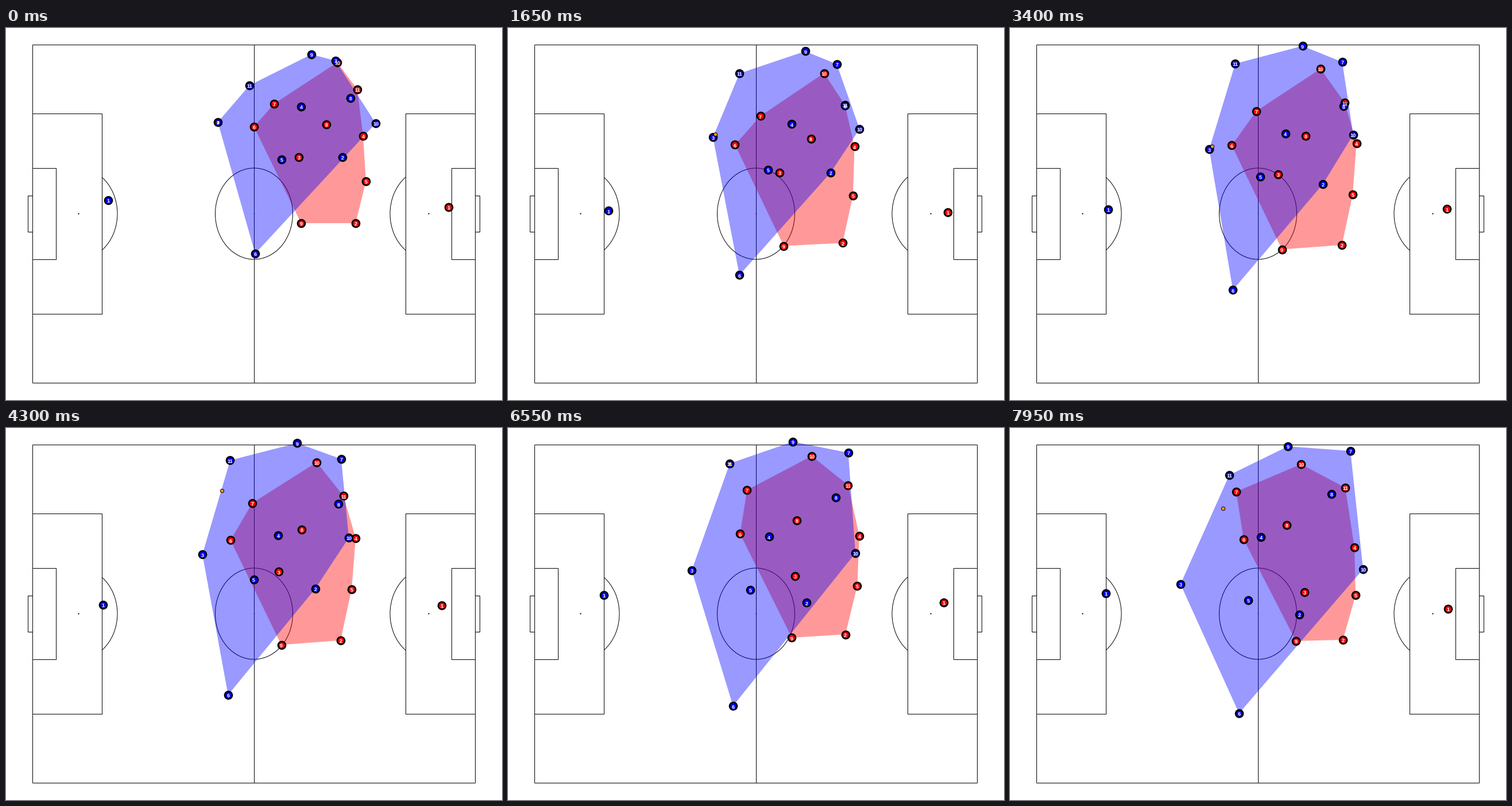
A matplotlib script for the animation above (8 s loop, 864 by 648 pixels).

```python
import numpy as np
import matplotlib.pyplot as plt
from matplotlib.animation import FuncAnimation
from matplotlib.patches import Arc, Circle, Polygon, Rectangle

W, H, FRAMES, STEP = 864, 648, 160, 50
LEFT, RIGHT, TOP, BOTTOM = 46, 817, 29, 618
MID_X, MID_Y = 432, 323.5

frames = np.arange(FRAMES)
u = (frames / (FRAMES - 1))[:, None]

# Each team drifts back and forth as one block; keepers mostly up and down.
SWAY = {"red": (-11.7, 16.9), "blue": (-4.4, 4.8), "keeper": (1, 10)}
teams = {"red": [], "blue": []}


def player(team, start, mid, end):
    """Parabola through three places, plus the sway of the block."""
    start, mid, end = map(np.array, (start, mid, end))
    bend = mid - (start + end) / 2
    run = start + (end - start) * u + bend * 4 * u * (1 - u)
    sway = SWAY[team if teams[team] else "keeper"]
    teams[team].append(run + np.array(sway) * np.sin(2 * np.pi * u))


# Shirt numbers follow the order of the calls, starting with the keeper.
player("red", (771, 312), (760, 311), (763, 315))
player("red", (609, 340), (581, 373), (580, 369))
player("red", (510, 225), (472, 252), (513, 286))
player("red", (622, 188), (607, 195), (600, 208))
player("red", (627, 267), (600, 284), (602, 291))
player("red", (432, 172), (389, 199), (407, 194))
player("red", (467, 132), (429, 136), (394, 111))
player("red", (558, 168), (515, 181), (482, 169))
player("red", (514, 340), (477, 381), (498, 371))
player("red", (577, 60), (541, 64), (507, 63))
player("red", (612, 107), (586, 123), (584, 104))

player("blue", (178, 300), (170, 311), (167, 288))
player("blue", (586, 225), (541, 277), (504, 325))
player("blue", (369, 164), (344, 217), (297, 272))
player("blue", (514, 137), (476, 186), (437, 190))
player("blue", (480, 229), (433, 262), (415, 300))
player("blue", (434, 393), (387, 462), (399, 497))
player("blue", (574, 57), (582, 56), (593, 40))
player("blue", (600, 122), (580, 134), (560, 115))
player("blue", (532, 46), (508, 28), (484, 32))
player("blue", (644, 166), (597, 189), (615, 246))
player("blue", (424, 100), (391, 58), (382, 82))


def ease(first, last):
    return np.clip((frames - first) / (last - first), 0, 1)[:, None]


def ball_run():
    """Dribbled by blue 3, passed to blue 11, then played back."""
    three, eleven = teams["blue"][2], teams["blue"][10]
    touch = np.abs(np.sin(np.pi * frames / 50))[:, None]
    dribble = three + np.array((5, -6)) * touch
    run = dribble + (eleven - dribble) * ease(68, 95)
    return run + (np.array((371, 140)) - run) * ease(149, 159)


ball_path = ball_run()


def hull(points):
    pts = sorted(map(tuple, points))

    def chain(seq):
        out = []
        for p in seq:
            while len(out) > 1:
                (ax, ay), (bx, by) = out[-2:]
                if (bx - ax) * (p[1] - ay) - (by - ay) * (p[0] - ax) > 0:
                    break
                out.pop()
            out.append(p)
        return out[:-1]

    return chain(pts) + chain(pts[::-1])


fig = plt.figure(figsize=(W / 72, H / 72), dpi=72, facecolor="white")
ax = fig.add_axes([0, 0, 1, 1])
ax.set_xlim(0, W)
ax.set_ylim(H, 0)
ax.axis("off")

LINE = dict(fill=False, ec="black", lw=1, zorder=1)


def box(x0, y0, x1, y1):
    ax.add_patch(Rectangle((x0, y0), x1 - x0, y1 - y0, **LINE))


def dot(x, y, r):
    ax.add_patch(Circle((x, y), r, color="black", lw=0, zorder=1))


def curve(x, **span):
    ax.add_patch(Arc((x, MID_Y), 135, 159, **span, **LINE))


box(LEFT, TOP, RIGHT, BOTTOM)
ax.plot([MID_X, MID_X], [TOP, BOTTOM], color="black", lw=1, zorder=1)
curve(MID_X)
dot(MID_X + 0.5, MID_Y, 0.8)
for goal, side in ((LEFT, 1), (RIGHT, -1)):
    for depth, top, bottom in ((121, 149, 498), (41, 244, 403),
                               (-8, 292, 355)):
        box(goal, top, goal + side * depth, bottom)
    spot = goal + side * 80.5
    dot(spot, MID_Y, 1.1)
    curve(spot, theta1=-57.5, theta2=57.5, angle=0 if side > 0 else 180)

areas, dots, labels = {}, {}, {}
for z, team in enumerate(teams):
    areas[team] = ax.add_patch(Polygon([(0, 0)] * 3, fc=team, alpha=0.4,
                                       lw=0, zorder=2 + z))
    dots[team], = ax.plot([], [], "o", ms=13, mfc=team, mec="black", mew=2.6,
                          zorder=4 + z)
    labels[team] = [ax.text(0, 0, str(n), color="white", size=9, zorder=7,
                            family="Liberation Sans", weight="bold",
                            ha="center", va="center_baseline")
                    for n in range(1, 12)]
ball, = ax.plot([], [], "o", ms=6.2, mfc="#ff9900", mec="black", mew=1,
                zorder=6)


def draw(frame):
    for team, paths in teams.items():
        pos = np.array([p[frame] for p in paths])
        areas[team].set_xy(hull(pos[1:]))
        dots[team].set_data(pos[:, 0], pos[:, 1])
        for label, (x, y) in zip(labels[team], pos):
            label.set_position((x, y + 0.8))
    ball.set_data(ball_path[frame:frame + 1, 0], ball_path[frame:frame + 1, 1])
    return []


anim = FuncAnimation(fig, draw, frames=FRAMES, interval=STEP, repeat=True,
                     repeat_delay=0, blit=False)
plt.show()
```
